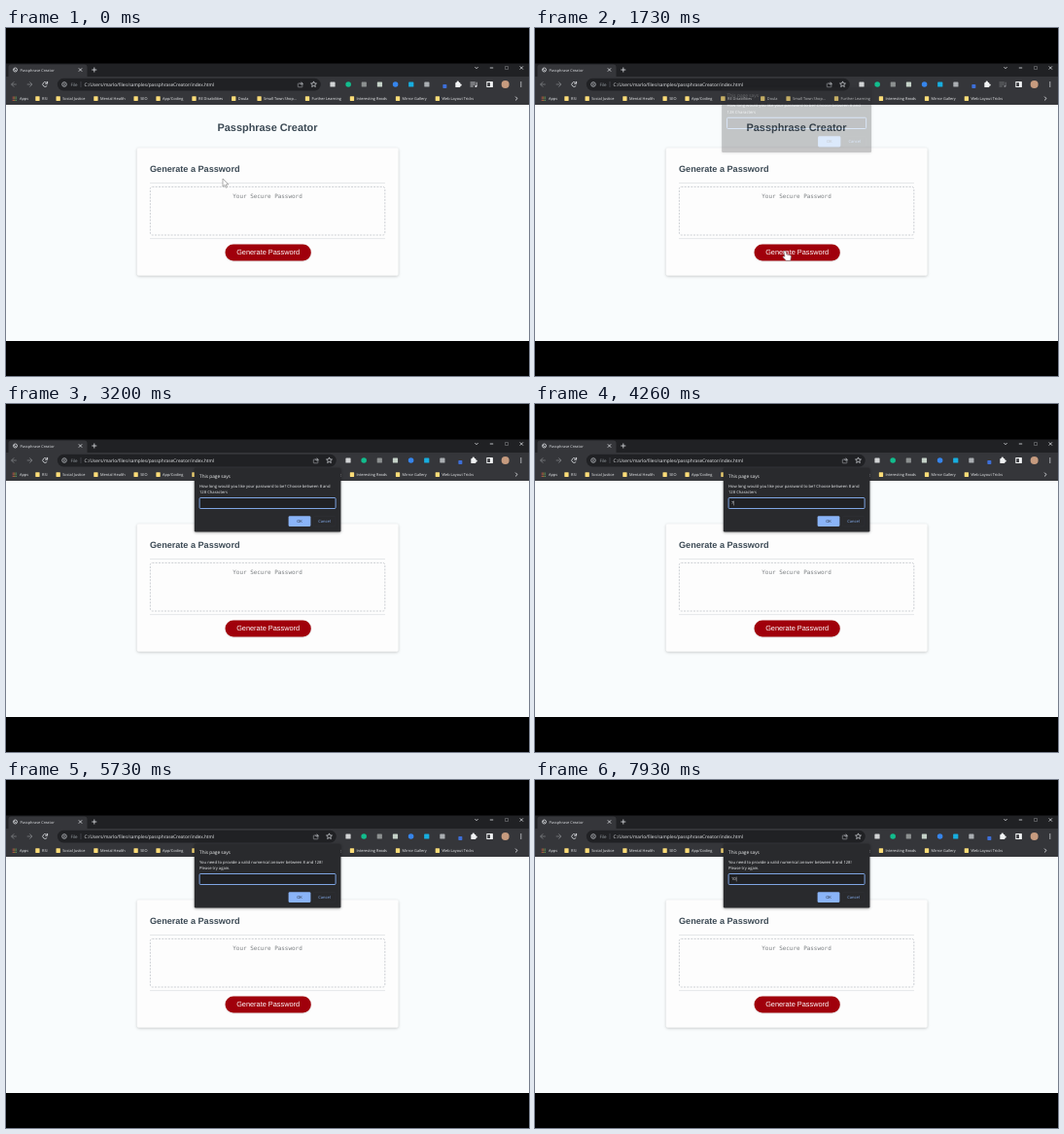
Write an HTML page with a canvas that moves like this. It is 538 by 358 pixels and loops after 8 s.

```html
<!DOCTYPE html>
<html lang="en">
<head>
<meta charset="utf-8">
<title>Passphrase Creator</title>
<style>
html, body { margin: 0; width: 100%; height: 100%; overflow: hidden; background: #000; }
canvas { display: block; width: 538px; height: 358px; }
</style>
</head>
<body>
<canvas id="stage" width="538" height="358"></canvas>
<script>
const W = 538, H = 358, LOOP = 8000, BLINK = 533;
const UI = '"Open Sans", "Noto Sans", sans-serif';
const PAGE = '"Liberation Sans", Arial, sans-serif';
const MONO = '"DejaVu Sans Mono", monospace';
const ICON = '#dfe1e5', DIM = '#7c7e82', BAR = '#35363a', DARK = '#202124', BLUE = '#8ab4f8', INK = '#3b4954';

const stage = document.getElementById('stage').getContext('2d');
const layer = new OffscreenCanvas(W, H).getContext('2d');
stage.textRendering = layer.textRendering = 'geometricPrecision';
let ctx = stage;

const clamp = v => Math.max(0, Math.min(1, v));
const ease = v => v * v * (3 - 2 * v);

function text(s, x, y, size, color, { font = UI, weight = '', align = 'left' } = {}) {
  ctx.font = `${weight} ${size}px ${font}`;
  ctx.fillStyle = color;
  ctx.textAlign = align;
  ctx.fillText(s, x, y);
}
function rect(x, y, w, h, color) {
  ctx.fillStyle = color;
  ctx.fillRect(x, y, w, h);
}
function outline(color, width) {
  ctx.strokeStyle = color;
  ctx.lineWidth = width;
  ctx.stroke();
}
function roundPath(x, y, w, h, r) {
  ctx.beginPath();
  ctx.roundRect(x, y, w, h, r);
}
function round(x, y, w, h, r, color) {
  roundPath(x, y, w, h, r);
  ctx.fillStyle = color;
  ctx.fill();
}
function roundWithShadow(x, y, w, h, r, color, opacity, blur) {
  ctx.save();
  ctx.shadowColor = `rgba(0,0,0,${opacity})`;
  ctx.shadowBlur = blur;
  ctx.shadowOffsetY = 0.8;
  round(x, y, w, h, r, color);
  ctx.restore();
}
function frame(x, y, w, h, r, color, width) {
  roundPath(x, y, w, h, r);
  outline(color, width);
}
function square(x, y, size, color) {
  round(x - size / 2, y - size / 2, size, size, 0.7, color);
}
function circle(x, y, r, color) {
  ctx.beginPath();
  ctx.arc(x, y, r, 0, 7);
  ctx.fillStyle = color;
  ctx.fill();
}
function ring(x, y, r, color, from = 0, to = 7) {
  ctx.beginPath();
  ctx.arc(x, y, r, from, to);
  outline(color, 0.8);
}
function line(x1, y1, x2, y2, color, width = 0.8) {
  ctx.beginPath();
  ctx.moveTo(x1, y1);
  ctx.lineTo(x2, y2);
  outline(color, width);
}
function cross(x, y, r, color) {
  line(x - r, y - r, x + r, y + r, color);
  line(x + r, y - r, x - r, y + r, color);
}
// A chevron of radius r whose tip points along the angle.
function chevron(x, y, r, angle, color) {
  ctx.save();
  ctx.translate(x, y);
  ctx.rotate(angle);
  ctx.beginPath();
  ctx.moveTo(-r, -r);
  ctx.lineTo(0, 0);
  ctx.lineTo(-r, r);
  outline(color, 0.9);
  ctx.restore();
}
function arrow(x, y, r, angle, color) {
  line(x - r * Math.cos(angle), y, x + r * Math.cos(angle), y, color);
  chevron(x + r * Math.cos(angle), y, r, angle, color);
}
function star(x, y, r) {
  ctx.beginPath();
  for (let i = 0; i < 10; i++) {
    const a = (i / 5 - 0.5) * Math.PI, d = i % 2 ? r * 0.45 : r;
    ctx.lineTo(x + d * Math.cos(a), y + d * Math.sin(a));
  }
  ctx.closePath();
  outline(ICON, 0.7);
}

function drawTabs() {
  rect(0, 36.5, W, 14, DARK);
  round(2.5, 37.5, 81, 14, [3, 3, 0, 0], BAR);
  const y = 43;
  ring(9.5, y, 2, ICON);
  line(8, 42.3, 10.5, 44, ICON);
  text('Passphrase Creator', 14.5, 44.5, 3.9, ICON);
  cross(76.5, y, 1.7, ICON);
  line(88.3, y, 93.3, y, ICON);
  line(90.8, y - 2.5, 90.8, y + 2.5, ICON);
  chevron(484, 41.7, 1.5, Math.PI / 2, ICON);
  line(497.8, 41, 501.2, 41, ICON);
  frame(513.5, 39.5, 3, 3, 0, DIM, 0.6);
  cross(530.3, 41, 1.6, ICON);
}

const EXTENSIONS = ['#d2d4d5', '#12bd8d', '#8c9090', '#c5d2c8', '#3685ec', '#17aee0', '#aaaeb2', '#3d6fd8'];
function drawExtensions(dx, mediaAlpha) {
  const y = 58, slot = i => 336 + 16.15 * i;
  EXTENSIONS.forEach((color, i) => {
    const x = slot(i) + dx;
    if (i === 7) square(x + 2.3, y + 2, 4, color);
    else if (i % 3 === 1) circle(x, y, 2.8, color);
    else square(x, y, 5.2, color);
  });

  const puzzle = slot(8) + dx;
  square(puzzle - 0.4, y + 0.6, 5, '#f1f3f4');
  circle(puzzle - 0.4, y - 2.2, 1.2, '#f1f3f4');
  circle(puzzle + 2.3, y + 0.6, 1.2, '#f1f3f4');

  if (!dx) {
    const x = slot(9);
    ctx.globalAlpha = mediaAlpha;
    for (let i = -1; i < 2; i++) line(x - 3.8, y + 2 * i, x + (i > 0 ? -0.6 : 1.4), y + 2 * i, ICON);
    line(x + 2.8, y - 2.3, x + 2.8, y + 2, ICON);
    circle(x + 2, y + 2, 1.1, ICON);
    ctx.globalAlpha = 1;
  }
  round(slot(10) - 3.2, y - 3, 6.6, 6, 0.6, '#f1f3f4');
  rect(slot(10) - 2.2, y - 1.8, 2.6, 3.8, BAR);
  circle(slot(11), y, 4, '#c69b7f');
  for (let i = -1; i < 2; i++) circle(slot(12), y + 2 * i, 0.65, ICON);
}

function drawToolbar(t) {
  const y = 58, dx = t < 1900 ? 0 : 16;
  rect(0, 50, W, 29, BAR);
  arrow(8.2, y, 2.6, Math.PI, DIM);
  arrow(24.3, y, 2.6, 0, DIM);
  ring(40.2, y, 2.4, ICON, 0.5, 5.5);
  chevron(42.6, 57.2, 1.6, Math.PI / 4, ICON);

  round(52.8, 51.8, 271 + dx, 12.6, 6.3, DARK);
  ring(60, y, 2.3, '#bdc1c6');
  line(60, y - 1.2, 60, y + 1.3, '#bdc1c6');
  text('File', 66.5, 59.5, 4.5, '#9aa0a6');
  line(77, 55, 77, 61, '#5f6368', 0.5);
  text('C:/Users/marlo/files/samples/passphraseCreator/index.html', 80.5, 59.5, 4.78, '#e8eaed');
  frame(300.3 + dx, 57, 4.6, 3.8, 0.5, '#a4a7ab', 0.6);
  arrow(303.7 + dx, 57.2, 1.6, 0, '#a4a7ab');
  star(316.5 + dx, y, 3.1);
  drawExtensions(dx, 1 - 0.6 * clamp((t - 1600) / 130));
}

const BOOKMARKS = [
  'RSI', 'Social Justice', 'Mental Health', 'SEO', 'App/Coding', 'RE Disabilities', 'Doula',
  'Small Town Shop...', 'Further Learning', 'Interesting Reads', 'Mirror Gallery', 'Web Layout Tricks'
];
function drawBookmarks() {
  const dots = ['#ea5a4f', '#e9b93b', '#56a969'];
  for (let i = 0; i < 9; i++) square(7.2 + (i % 3) * 1.7, 71.1 + Math.floor(i / 3) * 1.7, 1.1, dots[i % 3]);
  text('Apps', 14, 74.1, 3.9, '#eef0f2');
  let x = 30;
  for (const name of BOOKMARKS) {
    round(x + 0.3, 70.3, 4.3, 4.6, 0.4, '#fbdc78');
    text(name, x + 7, 74.1, 3.9, '#eef0f2');
    x += 15.6 + ctx.measureText(name).width;
  }
  chevron(526, 72.5, 1.9, 0, ICON);
}

function drawPage() {
  const mid = 269;
  rect(0, 79, W, 243, '#f9fcfd');
  text('Passphrase Creator', mid, 106.2, 10.9, INK, { font: PAGE, weight: 'bold', align: 'center' });

  roundWithShadow(134.7, 123.3, 269, 131.4, 1.7, '#fdfdfd', 0.22, 3);
  text('Generate a Password', 148, 148.4, 9.1, INK, { font: PAGE, weight: 'bold' });
  for (const y of [159, 216.3]) rect(148, y, 242, 0.8, '#e0e3e5');

  ctx.setLineDash([2, 1.3]);
  frame(148.4, 163.4, 241.4, 49.6, 2, '#c0c5c9', 0.8);
  ctx.setLineDash([]);
  text('Your Secure Password', mid, 174.8, 5.95, '#7b7f82', { font: MONO, align: 'center' });

  roundWithShadow(225.5, 222.6, 88.3, 16.8, 8.4, '#a0000b', 0.12, 2);
  text('Generate Password', 269.6, 233.2, 7.35, '#fff', { font: PAGE, align: 'center' });
}

function dialogState(t) {
  const first = t < 5150;
  const open = clamp((t - (first ? 1660 : 5200)) / 200);
  const close = first ? clamp((t - 4890) / 200) : 0;
  return {
    away: close || 1 - open,
    alpha: close ? 1 - close * close : open ** 1.3,
    focused: open === 1 && !close,
    message: first
      ? ['How long would you like your password to be? Choose between 8 and', '128 Characters']
      : ['You need to provide a valid numerical answer between 8 and 128!', 'Please try again.'],
    value: first ? '7'.slice(0, t >= 3860 ? 1 : 0) : '10'.slice(0, clamp((t - 7400) / 400) * 2)
  };
}

// The caret restarts its blink with each key press.
function caretOn(t) {
  const start = [7600, 5867, 3860, 1600].find(s => t >= s);
  return Math.floor((t - start) / BLINK) % 2 === 0;
}

function drawDialog(t) {
  const d = dialogState(t);
  if (d.alpha <= 0) return;
  const scale = 1 + 0.034 * d.away, cx = 269, cy = 98.5;
  ctx = layer;
  ctx.clearRect(0, 0, W, H);
  ctx.save();
  ctx.translate(cx, cy - 6.5 * d.away);
  ctx.scale(scale, scale);
  ctx.translate(-cx, -cy);

  roundWithShadow(193.8, 65.8, 150.6, 65.6, 1.2, '#292a2d', 0.4, 3);
  text('This page says', 199, 75.8, 4.75, '#f1f3f4');
  d.message.forEach((s, i) => text(s, 199, 85.5 + i * 6.6, 4.15, '#eceef0'));

  round(199, 96.4, 140.3, 11.2, 1, DARK);
  if (t < 4890 || t > 5150) frame(199.1, 96.5, 140, 11, 1, BLUE, 0.9);
  text(d.value, 202, 103.4, 4.1, '#e8eaed');
  if (d.focused && caretOn(t)) rect(202.2 + d.value.length * 2.35, 99.6, 0.4, 4.8, '#e8eaed');

  round(290.6, 115.2, 22.8, 10.9, 1.4, BLUE);
  text('OK', 302, 122.1, 4, DARK, { align: 'center' });
  frame(316.2, 115.4, 22.7, 10.5, 1.4, '#34373b', 0.4);
  text('Cancel', 327.5, 122.1, 4, BLUE, { align: 'center' });
  ctx.restore();

  ctx = stage;
  ctx.globalAlpha = d.alpha;
  ctx.drawImage(layer.canvas, 0, 0);
  ctx.globalAlpha = 1;
}

// The pointer eases from one stop to the next: start and end time, then the place reached.
const HOME = [223, 155], BUTTON = [257, 229.5], FIELD = [250, 102], OK = [296.5, 120.5];
const MOVES = [[60, 1130, BUTTON], [1860, 2930, FIELD], [4290, 4860, OK], [5400, 5700, FIELD]];
function pointerAt(t) {
  let [x, y] = HOME;
  for (const [from, to, [tx, ty]] of MOVES) {
    const k = ease(clamp((t - from) / (to - from)));
    x += (tx - x) * k;
    y += (ty - y) * k;
  }
  return [x, y];
}

const ARROW = new Path2D('M0 0V8.2L1.9 6.5 3.2 9.3 4.5 8.7 3.2 6H5.8Z');
const HAND = new Path2D('M-.3 0Q.8-.5 1.1 .6L1.7 3.4 5.4 4.2Q6.6 4.6 6.4 5.8L5.8 9.8H1.4L-2 6.2Q-2 5-.6 5.4L0 5.7-1 1Q-1.1 .2-.3 0Z');
function drawPointer(t) {
  const [x, y] = pointerAt(t);
  const inField = t > 1860 && y > 96 && y < 107.6;
  if (inField) return;
  const shape = t > 860 && t < 2930 ? HAND : ARROW;
  ctx.save();
  ctx.translate(x, y);
  ctx.fillStyle = '#fff';
  ctx.fill(shape);
  ctx.strokeStyle = '#777';
  ctx.lineWidth = 0.6;
  ctx.stroke(shape);
  ctx.restore();
}

function draw(t) {
  rect(0, 0, W, H, '#000');
  drawTabs();
  drawToolbar(t);
  drawBookmarks();
  drawPage();
  drawDialog(t);
  drawPointer(t);
}

const began = performance.now();
function tick() {
  draw((performance.now() - began) % LOOP);
  requestAnimationFrame(tick);
}
tick();
</script>
</body>
</html>
```
